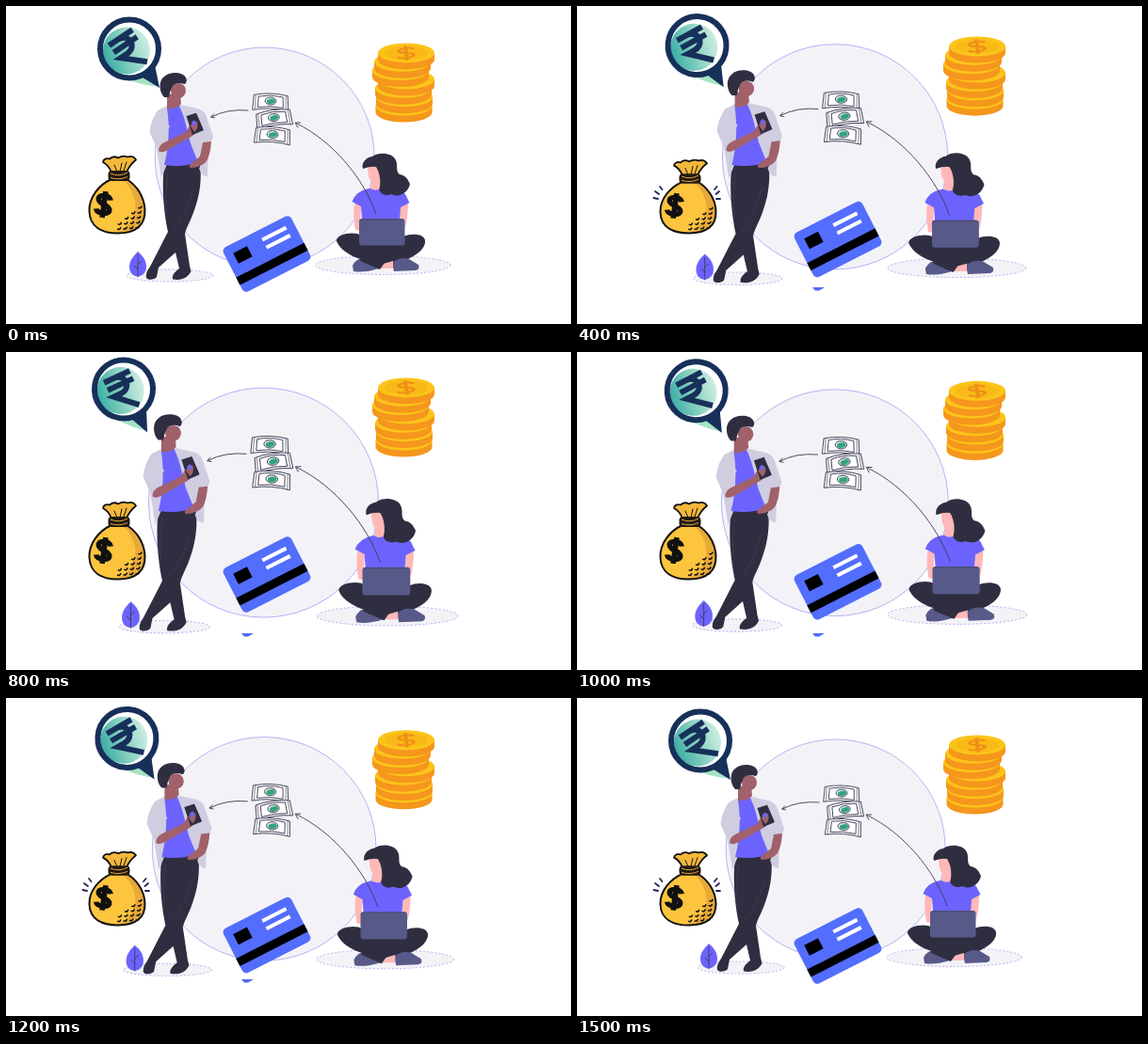
Recreate the animation shown at these times as an HTML page. Size 600 by 338 pixels, loop 1.6 s.

```html
<!DOCTYPE html>
<html lang="en">
<head>
<meta charset="utf-8">
<title>Money transfer</title>
<style>
html, body { margin: 0; width: 100%; height: 100%; overflow: hidden; background: #fff; }
svg { display: block; width: 100vw; height: 100vh; }
.dark { fill: #2f2e41; }
.violet { fill: #6c63ff; }
.skin { fill: #a0616a; }
.rose { fill: #ffb8b8; }
.coat { fill: #d0cde1; }
.slate { fill: #575a89; }
.floor { fill: #f3f3f7; stroke: #8d83f0; stroke-width: .6; stroke-dasharray: 2 2; }
.line { fill: none; stroke: #3f3d56; stroke-width: .9; }
.ink { fill: none; stroke: #111; stroke-linecap: round; stroke-linejoin: round; }
.navy { fill: none; stroke: #17305a; }
</style>
</head>
<body>
<svg viewBox="0 0 600 338">
  <defs>
    <linearGradient id="teal" x1="0" y1=".7" x2="1" y2=".3">
      <stop stop-color="#35aaa3"/><stop offset=".45" stop-color="#7fcdbd"/><stop offset="1" stop-color="#d5f0e6"/>
    </linearGradient>
    <path id="dollar" d="M6-5C5-10-6-10-6-5C-6 0 6 0 6 5C6 10-6 10-7 5M0-13V13"/>
    <g id="bill">
      <path d="M-18-7Q0-11 18-7L19 9Q0 5-19 9Z" fill="#fff"/>
      <path d="M-13-5.500Q0-8.500 13-5.500L13.500 6Q0 3.500-13.500 6Z"/>
      <path d="M-16-7L-16.500 8.500M16-7L16.500 8.500" stroke-width=".6"/>
      <ellipse cy="-1" rx="6" ry="4" fill="#d9efe7"/>
      <ellipse cx=".5" cy="-.6" rx="4.600" ry="2.700" fill="#35a27f" stroke="none" transform="rotate(-10)"/>
    </g>
  </defs>

  <g id="scene">
    <circle class="floor" cx="274.700" cy="160.500" r="116.500" style="stroke-dasharray:none"/>

    <g id="man">
      <ellipse class="floor" cx="174" cy="286.500" rx="46" ry="6.500"/>
      <path class="violet" d="M140 261C146 266 149 271 149 277C149 283 145 287 140 287.500C134 287 131 283 131 277C131 271 135 266 140 261Z"/>
      <path class="line" d="M140 264V288M140 275L144 271M140 280L136 276" stroke-width=".6"/>
      <path class="dark" d="M168 168L206 168C208 182 206 200 201 214C197 227 192 234 190 242L195 276L196.500 282C193 289 187 292 177 290.500C176 286 179 283 184 279L180 262L162 278L160 288C158 291 151 292 149 289C148 284 151 280 153 277L172 240C168 222 165 195 168 168Z"/>
      <path d="M172 176Q168 205 171 225M200 192Q192 219 178 238" fill="none" stroke="#454459" stroke-width=".5"/>
      <path class="coat" d="M173 105L161 111Q154 121 152.500 134L160 151L165 183L171 168L204 163L214 181L215 151L220 139L211 114Q207 109 199 108L186 105Z"/>
      <path class="violet" d="M171 109L184 106Q189 117 191 126L196 146L204 166Q188 172 168 169C173 150 174 128 171 109Z"/>
      <path class="skin" d="M171 94L185 92L186 104Q181 110 171 109Z"/>
      <circle class="skin" cx="183" cy="90" r="8"/>
      <path class="dark" d="M168 97C162 91 162 79 168 75C174 69 188 70 191 76Q193 80 190 83Q181 80 177 85Q174 90 173 97Z"/>
      <path class="coat" d="M162 112Q154 122 153 134L161 153L173 147Q166 137 174 128Z"/>
      <path class="skin" d="M162 154Q162 148 168 145L191 134L197 124Q202 121 204 127Q204 134 198 138L172 153Q165 157 162 154Z"/>
      <path class="dark" d="M191.500 117L204 113L210 132L198 137Z"/>
      <path class="skin" d="M196 128Q198 121 203 123Q205 130 200 134Z"/>
      <path class="violet" d="M197 124L200 121L202 125L199 128Z"/>
      <path class="coat" d="M200 109Q210 109 213 118L220 139L218 145L209 147L204 137L210 132Z"/>
      <path class="skin" d="M209 145L218 144Q217 158 213 165Q207 172 196 172Q193 170 197 167L206 160Z"/>
      <path class="coat" d="M205 172L213 166L214 181Q207 181 205 172Z"/>
    </g>

    <g id="woman">
      <ellipse class="floor" cx="400.500" cy="275.500" rx="71.500" ry="10"/>
      <path class="rose" d="M370 210L377 211L376 239L371 238Q368 222 370 210ZM418 210L427 208Q427 225 424 235L418 238Z"/>
      <path class="violet" d="M385 194L408 194Q421 196 424 200L428.500 209L419 214L417 240L379 240L377 213L367.500 208Q371 197 385 194Z"/>
      <path class="rose" d="M384 171Q390 164 398 170L400 193Q393 198 387 194L388 187Q384 182 384 171Z"/>
      <path class="dark" d="M379 173C377 167 382 161 389 160C396 154.500 410 156 413.500 163C417 169 413 175 418 179C425 180 427 185 429 189C427 199 417 204 409 200C402 203 394 198 397 192C398 186 397 177 393 171Q387 170 379 173Z"/>
      <path class="dark" d="M373 242C363 240 350 244 351 250C355 260 368 267 380 270L398 279L412 274L424 270C435 266 446 258 445 249C444 242 431 241 422 245L400 254Z"/>
      <path class="slate" d="M368 276Q372 268 380 268L397 273L396 279Q380 284 369 282ZM410 273Q418 266 428 269L438 275Q440 280 435 281L412 282Z"/>
      <path class="rose" d="M397 275L411 271L411 279L397 279Z"/>
      <path class="dark" d="M378 262L402 273L397 280L376 271Z"/>
      <rect class="slate" x="375" y="226" width="48.500" height="28.500" rx="3"/>
      <path d="M376 229Q376 227 378 227H421" fill="none" stroke="#464568" stroke-width=".8"/>
    </g>

    <path class="line" d="M393 221C380 184 348 144 308 124.500M313 124L307 124L310 129.500M257.500 111Q235 109 218 118M221 114.500L217.500 118L222 119"/>
    <g class="line">
      <use href="#bill" transform="translate(281 102) rotate(2)"/>
      <use href="#bill" transform="translate(284.500 119.500) rotate(-8)"/>
      <use href="#bill" transform="translate(283 137.500) rotate(4)"/>
    </g>
  </g>

  <g id="bubble">
    <path d="M-4 32L-9 27L20 20L31 40Q14 39-4 32Z" fill="#a5e3c5"/>
    <path d="M10 28L27 17L32 41.500Z" fill="#17305a"/>
    <circle r="31" fill="#fff"/>
    <circle cx="-3" cy="2" r="25" fill="url(#teal)"/>
    <circle r="31" class="navy" stroke-width="6"/>
    <path class="navy" d="M-16-15H14M-16-6H14M-14-15H-5C9-15 9 3-5 3H-13L8 22" stroke-width="6" transform="rotate(-34)"/>
  </g>

  <g id="coins"></g>

  <path d="M250 299H263L257 302.500H253Z" fill="#4f6bf5"/>
  <g id="card">
    <rect x="-40.500" y="-26.500" width="81" height="53" rx="5" fill="#536dfe"/>
    <path d="M-40.500 7.500H40.500V16.500H-40.500ZM-31.500-17H-15V-4.500H-31.500Z"/>
    <path d="M2.500-15.500H31M2.500-6.200H31" stroke="#fff" stroke-width="4"/>
  </g>

  <g id="bag">
    <path fill="#fdc43e" d="M112 184C99 190 88 203 88.500 218C89 235 102 241.500 119 241.500C138 241.500 148 233 147.500 217C147 202 138 190 128 184Z"/>
    <path fill="#e8a938" d="M124 184C142 203 144 227 118 241.500C138 241.500 148 233 147.500 217C147 202 138 190 128 184Z"/>
    <path class="ink" d="M112 184C99 190 88 203 88.500 218C89 235 102 241.500 119 241.500C138 241.500 148 233 147.500 217C147 202 138 190 128 184Z" stroke-width="2"/>
    <path class="ink" d="M112 177Q109 169 103 166Q104 161 110 162.500Q114 158.500 119 161.500Q124 158.500 129 160.500Q135 158.500 138 163.500Q131 169 128 177Z" style="fill:#f5b83b" stroke-width="1.800"/>
    <path class="ink" d="M115 169L118 176M123 167L121 176M128 166L125 175" stroke-width="1"/>
    <rect x="108.500" y="175" width="23" height="11" rx="4" fill="#211a12"/>
    <path d="M111 178Q120 182 129 177M111 182.500Q120 185.500 129 181.500" fill="none" stroke="#e6a638"/>
    <path id="dots" class="ink" stroke-width="1.600"/>
    <use href="#dollar" class="ink" style="stroke-linecap:butt" stroke-width="5.200" transform="translate(104 211) rotate(8) scale(1.080)"/>
  </g>
  <path id="ticks" class="ink" d="M88 192L90.500 195M83 197L87 200M81.500 204L86 205M148.500 192L146 195M151 197L147.500 200M152 205L148 205" style="stroke:#27215e" stroke-width="1.800"/>
</svg>
<script>
const get = id => document.getElementById(id);
const move = (id, value) => get(id).setAttribute('transform', value);

// Stack of coins, bottom first; each entry is the centre x of one coin.
const centers = [422.5, 423, 422, 425, 419, 421, 425];
get('coins').innerHTML = centers.map((x, i) => {
  const y = 106 - i * 9.35;
  return `<path d="M${x - 30} ${y}v7a30 10.500 0 0 0 60 0v-7z" fill="#f5961d"/>
    <ellipse cx="${x}" cy="${y}" rx="30" ry="10.500" fill="#fcc419"/>`;
}).join('') + `<ellipse cx="425" cy="49.900" rx="23" ry="7.500" fill="#f9b916"/>
  <use href="#dollar" fill="none" stroke="#f08f18" stroke-width="3" transform="translate(425 49.900) rotate(-8) scale(1.300 .6)"/>`;

let dots = '';
for (let row = 0; row < 5; row++)
  for (let i = 0; i <= row && i < 4; i++)
    dots += `M${144 - i * 6.5 - row * .7} ${213 + row * 5.3 + i * .5}q-1 2.500-3 1.500`;
get('dots').setAttribute('d', dots);

function draw(now) {
  const step = Math.floor(now / 100) % 16;
  const p = Math.min(step, 15 - step) / 7;
  const squashed = step % 8 > 3;

  move('scene', `translate(300 169) scale(${1 + .047 * p}) translate(-300 -169)`);
  move('bubble', `translate(${131 - 6 * p} ${45.5 - 6 * p}) rotate(${9 * p})`);
  move('coins', `translate(0 ${-12 * p})`);
  move('card', `translate(277 ${263.5 - 27 * p}) rotate(-27)`);
  move('bag', squashed ? 'translate(0 11.600) scale(1 .952)' : '');
  get('ticks').style.display = squashed ? '' : 'none';
  requestAnimationFrame(draw);
}
draw(performance.now());
</script>
</body>
</html>
```
